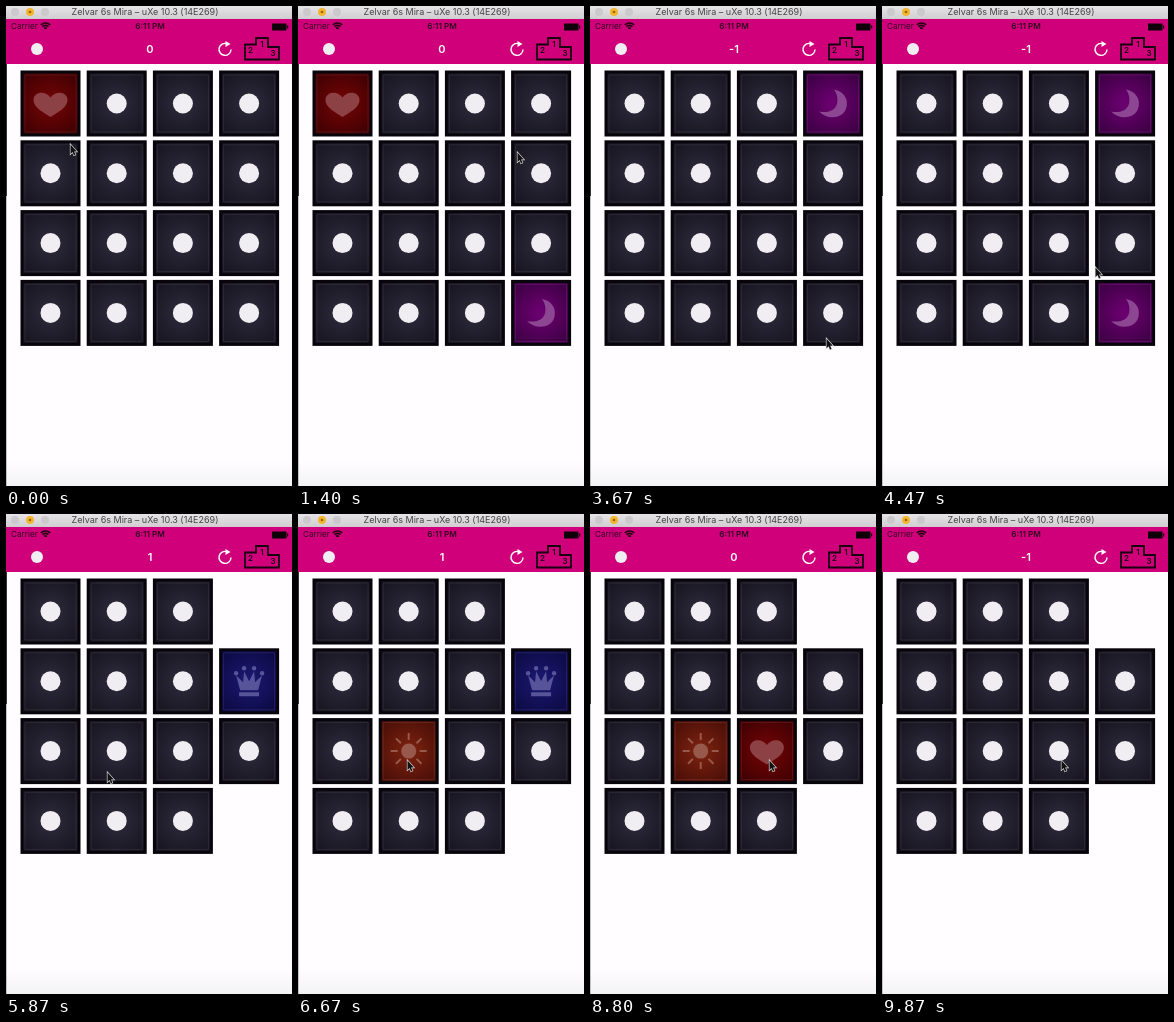
Write an HTML page with a canvas that moves like this. It is 286x480 px and loops after 9990 ms.

```html
<!DOCTYPE html>
<html lang="en">
<head>
<meta charset="utf-8">
<style>
  html, body { margin: 0; width: 100%; height: 100%; overflow: hidden; background: #fff; }
  canvas { display: block; width: 286px; height: 480px; }
</style>
</head>
<body>
<canvas id="stage" width="286" height="480"></canvas>
<script>
const ctx = document.getElementById('stage').getContext('2d');
const LOOP = 9990;
const SANS = 'Inter, Roboto, sans-serif';
const PINK = '#d0007b';

// Pointer tip: time, x, y
const pointerPath = [
  [0, 64, 138], [90, 64, 138], [730, 243, 300], [930, 243, 300], [1400, 219, 146],
  [1950, 233, 122], [2700, 233, 122], [3400, 238, 357], [3600, 236, 343],
  [3730, 236, 324], [4150, 236, 324], [4470, 213, 261], [5070, 238, 176],
  [5380, 238, 176], [5870, 101, 258], [6330, 101, 258], [6670, 109, 246],
  [7870, 109, 246], [8500, 179, 246], [LOOP, 179, 246]
];

// Face shown on a card (row, column) between two times
const reveals = [
  { row: 0, col: 0, face: 'heart', from: 0, to: 2000 },
  { row: 3, col: 3, face: 'moon', from: 800, to: 2000 },
  { row: 0, col: 3, face: 'moon', from: 2670, to: 5000 },
  { row: 3, col: 3, face: 'moon', from: 3870, to: 5000 },
  { row: 1, col: 3, face: 'crown', from: 5330, to: 7330 },
  { row: 2, col: 1, face: 'sun', from: 6130, to: 7330 },
  { row: 2, col: 1, face: 'sun', from: 7670, to: 9800 },
  { row: 2, col: 2, face: 'heart', from: 8600, to: 9800 }
];
const scores = [[0, '0'], [2000, '-1'], [5000, '1'], [7330, '0'], [9800, '-1']];
const MATCHED_AT = 5000;
const isMatched = (row, col, t) => t >= MATCHED_AT && col === 3 && (row === 0 || row === 3);

const faces = {
  heart: { center: '#700406', edge: '#380002', ink: '#8c4245' },
  moon: { center: '#68006e', edge: '#36003c', ink: '#8c4692' },
  crown: { center: '#19176c', edge: '#0b083e', ink: '#57549a' },
  sun: { center: '#78200f', edge: '#430c06', ink: '#96594c' }
};

function rect(x, y, w, h, color) {
  ctx.fillStyle = color;
  ctx.fillRect(x, y, w, h);
}

function disc(x, y, r, color) {
  ctx.fillStyle = color;
  ctx.beginPath();
  ctx.arc(x, y, r, 0, 7);
  ctx.fill();
}

function verticalFade(y0, y1, top, bottom) {
  const fade = ctx.createLinearGradient(0, y0, 0, y1);
  fade.addColorStop(0, top);
  fade.addColorStop(1, bottom);
  return fade;
}

function text(str, x, y, font, color, align = 'left') {
  ctx.font = `${font} ${SANS}`;
  ctx.fillStyle = color;
  ctx.textAlign = align;
  ctx.textBaseline = 'middle';
  ctx.fillText(str, x, y);
}

function stroke(path, color, width) {
  ctx.strokeStyle = color;
  ctx.lineWidth = width;
  ctx.stroke(new Path2D(path));
}

const symbols = {
  heart() {
    ctx.fill(new Path2D('M0 13.5C-7 9-17 4-17-3.5C-17-12-5-13.5 0-6C5-13.5 17-12 17-3.5C17 4 7 9 0 13.5Z'));
  },
  moon() {
    ctx.fill(new Path2D('M1-14C11-12 16-4 13 5C10 15-6 17-14 8C-5 10 2 7 4 0C5-5 4-10 1-14Z'));
  },
  crown() {
    ctx.fill(new Path2D('M-9 9L-13-6L-6 1L-5-10L0 0L5-10L6 1L13-6L9 9ZM-10 11H10V15H-10Z'));
    for (const [x, y] of [[-13, -8], [-5, -13], [5, -13], [13, -8]]) disc(x, y, 2.2, ctx.fillStyle);
  },
  sun() {
    disc(0, 0, 7.5, ctx.fillStyle);
    ctx.lineWidth = 2;
    ctx.beginPath();
    for (let i = 0; i < 8; i++) {
      const c = Math.cos(i * Math.PI / 4), s = Math.sin(i * Math.PI / 4);
      ctx.moveTo(c * 11, s * 11);
      ctx.lineTo(c * 18, s * 18);
    }
    ctx.stroke();
  }
};

function drawCard(x, y, faceName) {
  const { center, edge, ink } = faces[faceName] || { center: '#2b2838', edge: '#15131e' };
  ctx.save();
  ctx.translate(x, y);
  rect(0, 0, 60, 66, '#07050b');
  const glow = ctx.createRadialGradient(30, 33, 5, 30, 33, 42);
  glow.addColorStop(0, center);
  glow.addColorStop(1, edge);
  rect(3, 3, 54, 60, glow);
  ctx.globalAlpha = 0.4;
  stroke('M4.5 4.5H55.5V61.5H4.5Z', faceName ? ink : '#5b5663', 0.7);
  ctx.globalAlpha = 1;
  ctx.translate(30, 33);
  if (faceName) {
    ctx.fillStyle = ctx.strokeStyle = ink;
    symbols[faceName]();
  } else {
    disc(0, 0, 10, '#f0eef2');
  }
  ctx.restore();
}

function drawTitleBar() {
  rect(0, 0, 286, 13, verticalFade(0, 13, '#e6e4e6', '#d0ced0'));
  disc(9, 6, 4, '#cbc9cb');
  disc(24, 6, 4, '#f3b52f');
  disc(24, 6, 1.3, '#9b6500');
  disc(39, 6, 4, '#cbc9cb');
  text('Zelvar 6s Mira – uXe 10.3 (14E269)', 139, 6.5, '9px', '#444', 'center');
}

function drawHeader(score) {
  rect(0, 13, 286, 45, PINK);
  text('Carrier', 5, 21, '8.2px', '#32051f');
  for (const r of [2, 4.5, 7]) {
    ctx.beginPath();
    ctx.arc(39.5, 24, r, -2.3, -0.84);
    ctx.strokeStyle = '#20000f';
    ctx.lineWidth = 1.7;
    ctx.stroke();
  }
  text('6:11 PM', 144, 21, '600 8.2px', '#32051f', 'center');
  rect(266, 17.5, 14.5, 7, '#100008');
  rect(281, 19.5, 1.2, 3, '#100008');

  disc(31, 43, 6, '#f0eef2');
  text(score, 144, 43.5, '600 11px', '#fff', 'center');
  stroke('M221 37.7A6 6 0 1 0 225 43.5', '#fff', 1.4);
  ctx.fillStyle = '#fff';
  ctx.fill(new Path2D('M219.5 35L224.5 38L219.5 41Z'));
  stroke('M239 53.5V38.5H250V32H262V41H273V53.5Z', '#180010', 1.8);
  text('2', 244.5, 44.5, '600 8px', '#180010', 'center');
  text('1', 256, 38.5, '600 8px', '#180010', 'center');
  text('3', 267, 47.5, '600 8px', '#180010', 'center');
}

function drawPointer(t) {
  const i = pointerPath.findIndex(p => p[0] > t);
  const [t0, x0, y0] = pointerPath[i - 1];
  const [t1, x1, y1] = pointerPath[i];
  const p = (t - t0) / (t1 - t0);
  const eased = p * p * (3 - 2 * p);
  ctx.save();
  ctx.translate(x0 + (x1 - x0) * eased, y0 + (y1 - y0) * eased);
  const arrow = 'M.5 .5V10L2.6 8.1L4 11.4L5.5 10.7L4.1 7.5H6.8Z';
  stroke(arrow, '#ddd', 1.3);
  ctx.fillStyle = '#111';
  ctx.fill(new Path2D(arrow));
  ctx.restore();
}

function draw(t) {
  rect(0, 0, 286, 480, '#fffdff');
  rect(0, 455, 286, 25, verticalFade(455, 480, '#fffdff', '#f3f2f5'));
  drawTitleBar();
  drawHeader(scores.filter(s => s[0] <= t).pop()[1]);
  rect(0, 58, 1, 132, '#333');
  rect(0, 190, 1, 290, '#c4c2c6');
  for (let row = 0; row < 4; row++) {
    for (let col = 0; col < 4; col++) {
      if (isMatched(row, col, t)) continue;
      const open = reveals.find(r => r.row === row && r.col === col && t >= r.from && t < r.to);
      drawCard(14.5 + col * 66.2, 64.5 + row * 69.8, open && open.face);
    }
  }
  drawPointer(t);
}

const start = performance.now();
function tick() {
  draw((performance.now() - start) % LOOP);
  requestAnimationFrame(tick);
}
tick();
</script>
</body>
</html>
```
